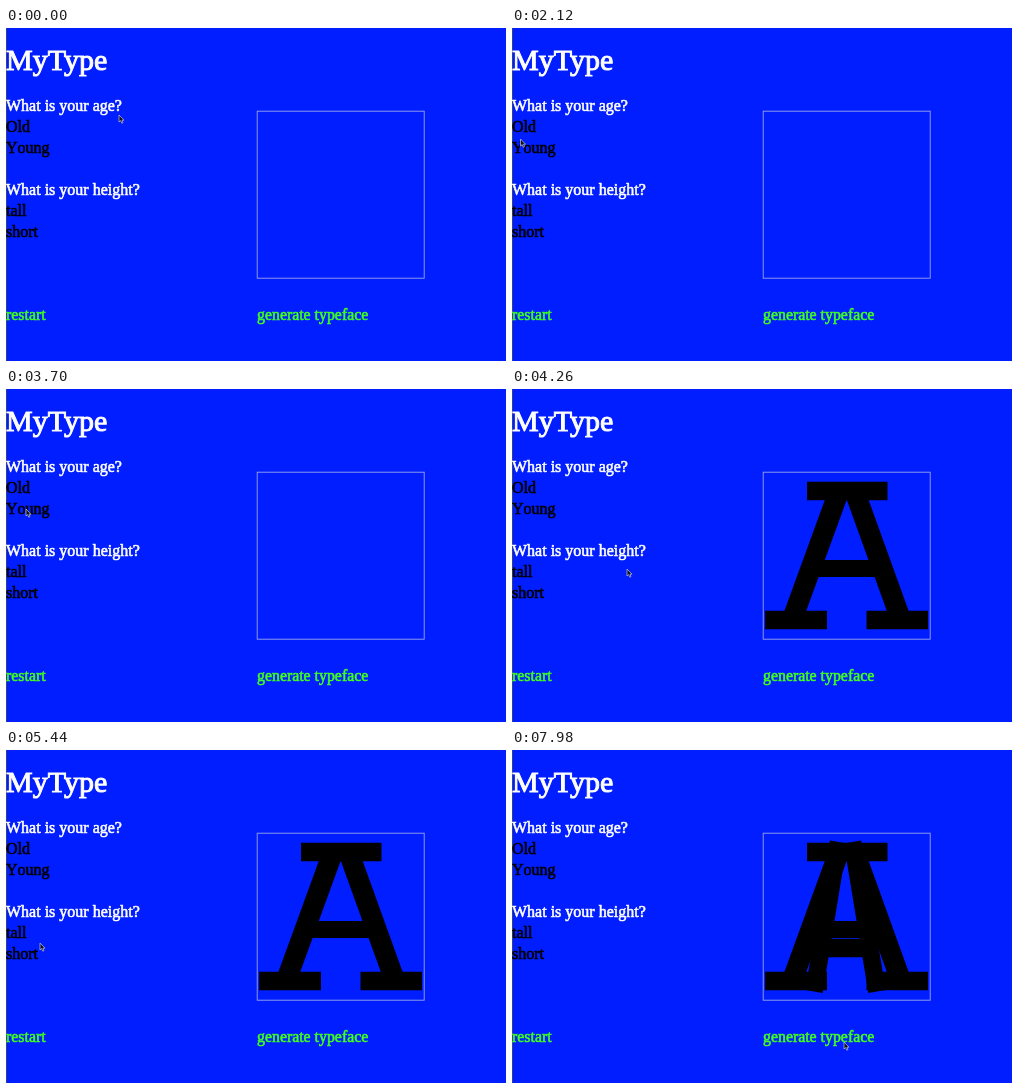
An HTML page for the animation above (8000 ms loop, 500 by 333 pixels).

```html
<!DOCTYPE html>
<html lang="en">
<head>
<meta charset="utf-8">
<title>MyType</title>
<style>
  html, body { margin: 0; width: 100%; height: 100%; overflow: hidden; background: #001eff; }
  svg { display: block; width: 100%; height: 100%; }
  text { font: 16px "Liberation Serif", "Times New Roman", serif; font-kerning: none; stroke-width: .6px; }
  .title { font-size: 30px; font-kerning: normal; stroke-width: 1px; }
  .light { fill: #fff; stroke: #fff; }
  .dark { fill: #000; stroke: #000; }
  .link { fill: #40ff20; stroke: #40ff20; }
  .link text { font-size: 15.85px; }
  .letter { fill: none; stroke: #000; }
</style>
</head>
<body>
<svg viewBox="0 0 500 333">
  <rect width="500" height="333" fill="#001eff"/>
  <rect width="1" height="333" fill="#30408c"/>

  <g class="light">
    <text class="title" x="0" y="42">MyType</text>
    <text x="0" y="83">What is your age?</text>
    <text x="0" y="167">What is your height?</text>
  </g>
  <g class="dark">
    <text x="0" y="104">Old</text>
    <text x="0" y="125">Young</text>
    <text x="0" y="188">tall</text>
    <text x="0" y="209">short</text>
  </g>
  <g class="link">
    <text x="0" y="292">restart</text>
    <text x="251" y="292">generate typeface</text>
  </g>

  <rect x="251.2" y="83.2" width="167" height="167" fill="none" stroke="#9ca4e8" stroke-width=".9"/>

  <g id="wide" class="letter">
    <path stroke-width="18.5" d="M295 102H375.500M253 231H315M354.500 231H416"/>
    <path stroke-width="17" d="M305 179.500H365"/>
    <path stroke-width="20.5" d="M327 102L280 231M342.500 102L389 231"/>
  </g>
  <g id="narrow" class="letter">
    <path stroke-width="18.5" d="M310 198H357"/>
    <path stroke-width="17.500" d="M326.500 92L302 241.500M340.500 92L365 241.500"/>
  </g>

  <path id="cursor" d="M0 0V7L1.700 5.600L2.800 8.200L4 7.700L3 5.200H5Z"
        fill="#101018" stroke="#c4c8e0" stroke-width=".7" stroke-linejoin="round"/>
</svg>
<script>
  const LOOP = 8000;
  const GLIDE = 700;
  const WIDE_AT = 3840;
  const NARROW_AT = 6440;

  // Where the pointer comes to rest, and when it gets there
  const rests = [
    { at: 0, x: 113, y: 87 },
    { at: 900, x: 14, y: 95 },
    { at: 2120, x: 8.5, y: 111 },
    { at: 3700, x: 20, y: 120 },
    { at: 4260, x: 115, y: 180 },
    { at: 5440, x: 34, y: 193 },
    { at: 6600, x: 15, y: 184 },
    { at: 7300, x: 332, y: 292 }
  ];

  const byId = id => document.getElementById(id);
  const show = (id, on) => byId(id).setAttribute("visibility", on ? "visible" : "hidden");
  const smooth = p => p * p * (3 - 2 * p);

  function pointerAt(time) {
    let { x, y } = rests[0];
    rests.slice(1).forEach((rest, i) => {
      const start = Math.max(rests[i].at, rest.at - GLIDE);
      const progress = (time - start) / (rest.at - start);
      const eased = smooth(Math.min(1, Math.max(0, progress)));
      x += (rest.x - rests[i].x) * eased;
      y += (rest.y - rests[i].y) * eased;
    });
    return [x, y];
  }

  function draw() {
    const time = performance.now() % LOOP;
    show("wide", time >= WIDE_AT);
    show("narrow", time >= NARROW_AT);
    byId("cursor").setAttribute("transform", `translate(${pointerAt(time)})`);
    requestAnimationFrame(draw);
  }
  draw();
</script>
</body>
</html>
```
